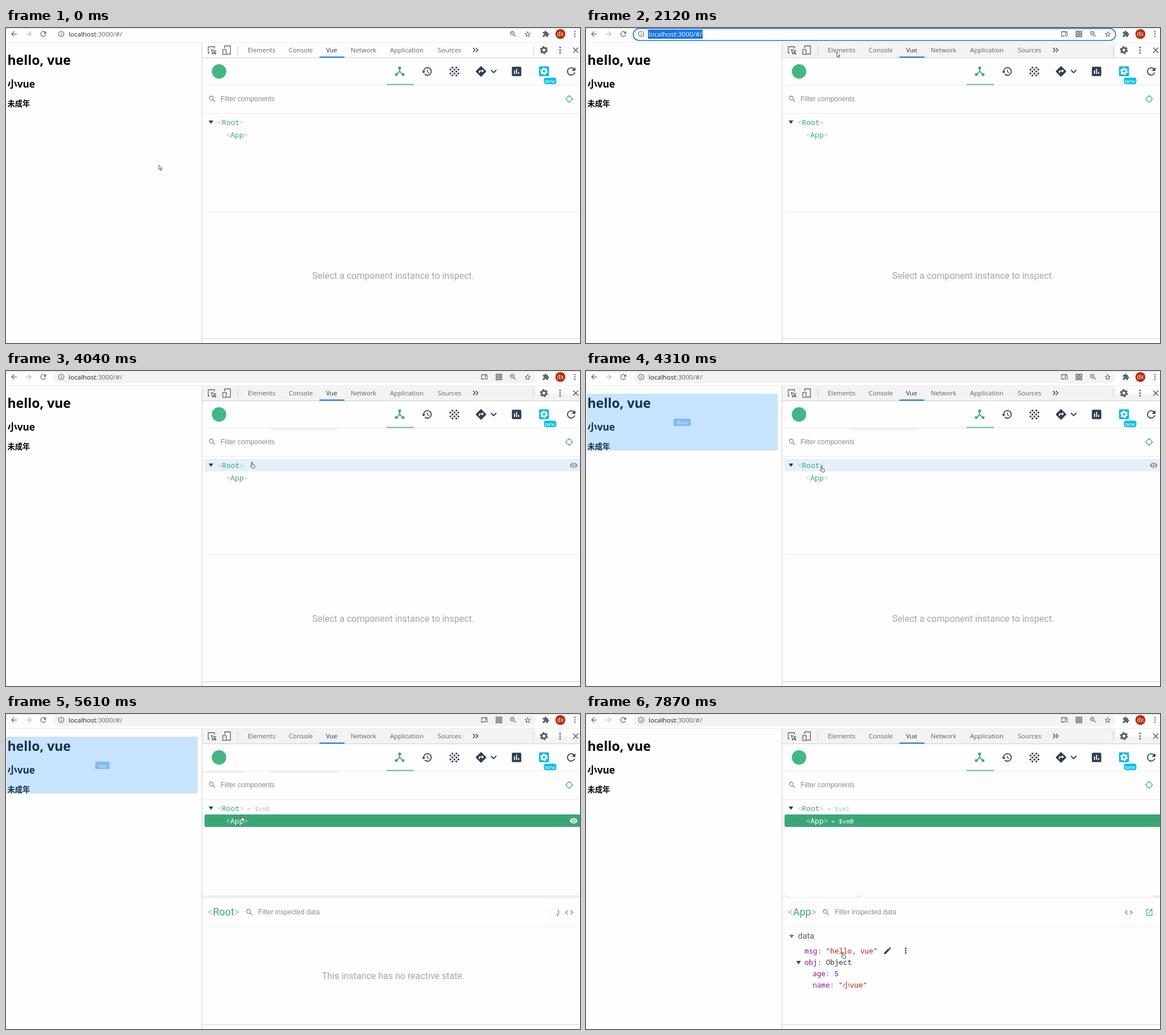
An HTML page that plays this animation: 1009x555 px, repeating every 7.99 s.

```html
<!DOCTYPE html>
<html lang="en">
<head>
<meta charset="utf-8">
<title>Component inspector</title>
<style>
html, body { margin: 0; width: 100%; height: 100%; overflow: hidden; background: #fefefe; }
svg { display: block; width: 1009px; height: 555px; }
text { white-space: pre; }
.ui { font-family: "Open Sans", "Noto Sans CJK SC", sans-serif; }
.cjk { font-family: "Noto Sans CJK SC", "Noto Sans CJK", sans-serif; }
.arial { font-family: "Liberation Sans", sans-serif; }
.roboto { font-family: Roboto, sans-serif; }
.mono { font-family: "Noto Sans Mono", "Noto Sans CJK SC", monospace; }
.serif { font-family: "Liberation Serif", serif; }
.bold { font-weight: 700; }
</style>
</head>
<body>
<svg id="stage" viewBox="0 0 1009 555"></svg>
<script>
const LOOP = 7990;
const GREEN = '#3ba776', INK = '#2c3e50', GREY = '#5f6368', LINE = '#e8e8e8';

const escape = s => s.replace(/&/g, '&amp;').replace(/</g, '&lt;').replace(/>/g, '&gt;');
const text = (x, y, s, size, fill, cls, extra = '') =>
  `<text x="${x}" y="${y}" font-size="${size}" fill="${fill}" class="${cls}" ${extra}>${escape(s)}</text>`;
const runs = (x, y, size, parts, cls = 'mono') =>
  `<text x="${x}" y="${y}" font-size="${size}" class="${cls}">` +
  parts.map(([s, fill]) => `<tspan fill="${fill}">${escape(s)}</tspan>`).join('') + '</text>';
const rect = (x, y, w, h, fill, rx = 0, extra = '') =>
  `<rect x="${x}" y="${y}" width="${w}" height="${h}" fill="${fill}" rx="${rx}" ${extra}/>`;
const disc = (x, y, r, fill) => `<circle cx="${x}" cy="${y}" r="${r}" fill="${fill}"/>`;
const ring = (x, y, r, stroke, w = 1.4, extra = '') =>
  `<circle cx="${x}" cy="${y}" r="${r}" fill="none" stroke="${stroke}" stroke-width="${w}" ${extra}/>`;
const path = (d, stroke, w = 1.4) => `<path d="${d}" fill="none" stroke="${stroke}" stroke-width="${w}"/>`;
const dots = (x, y, gap, r, fill) => [-gap, 0, gap].map(d => disc(x, y + d, r, fill)).join('');

// Shows its content from one time until another.
const during = (from, to, ...content) =>
  `<g data-from="${from}" data-to="${to}">${content.join('')}</g>`;

const GLYPHS = {
  back: 'M20 11H7.8l5.6-5.6L12 4l-8 8 8 8 1.4-1.4L7.8 13H20z',
  reload: 'M17.65 6.35A8 8 0 1 0 19.73 14h-2.08A6 6 0 1 1 12 6c1.66 0 3.14.69 4.22 1.78L13 11h7V4z',
  search: 'M15.5 14h-.8l-.3-.3A6.5 6.5 0 1 0 13.7 14.4l.3.3v.8l5 5 1.5-1.5zM9.5 14a4.5 4.5 0 1 1 0-9 4.5 4.5 0 0 1 0 9z',
  star: 'M12 2l3 7 7.3.7-5.5 4.8 1.6 7.2L12 18l-6.4 3.7 1.6-7.2L1.7 9.7 9 9zM12 6.5l-1.7 4-4.3.4 3.3 2.8-1 4.2 3.7-2.2 3.7 2.2-1-4.2 3.3-2.8-4.3-.4z',
  puzzle: 'M20.5 11H19V7a2 2 0 0 0-2-2h-4V3.5a2.5 2.5 0 0 0-5 0V5H4a2 2 0 0 0-2 2v3.8h1.5a2.7 2.7 0 0 1 0 5.4H2V20a2 2 0 0 0 2 2h3.8v-1.5a2.7 2.7 0 0 1 5.4 0V22H17a2 2 0 0 0 2-2v-4h1.5a2.5 2.5 0 0 0 0-5z',
  hub: 'M17 16l-4-4V8.8A3 3 0 1 0 11 8.8V12l-4 4H3v5h5v-3l4-4.2 4 4.2v3h5v-5z',
  history: 'M13 3a9 9 0 0 0-9 9H1l4 4 4-4H6a7 7 0 1 1 2.06 4.94l-1.42 1.42A9 9 0 1 0 13 3zM12 8v5l4.3 2.5.7-1.2-3.5-2V8z',
  route: 'M21.7 11.3l-9-9a1 1 0 0 0-1.4 0l-9 9a1 1 0 0 0 0 1.4l9 9a1 1 0 0 0 1.4 0l9-9a1 1 0 0 0 0-1.4zM14 14.5V12h-4v3H8v-4a1 1 0 0 1 1-1h5V7.5l3.5 3.5z',
  chart: 'M5 3h14a2 2 0 0 1 2 2v14a2 2 0 0 1-2 2H5a2 2 0 0 1-2-2V5a2 2 0 0 1 2-2zM7 10v7h2v-7zM11 7v10h2V7zM15 13v4h2v-4z',
  pencil: 'M3 17.2V21h3.8L17.8 9.9l-3.7-3.7zM20.7 7a1 1 0 0 0 0-1.4l-2.3-2.3a1 1 0 0 0-1.4 0l-1.9 1.8 3.8 3.8z',
  eye: 'M12 4.5C7 4.5 2.7 7.6 1 12c1.7 4.4 6 7.5 11 7.5s9.3-3.1 11-7.5c-1.7-4.4-6-7.5-11-7.5zM12 17a5 5 0 1 1 0-10 5 5 0 0 1 0 10zm0-8a3 3 0 1 0 0 6 3 3 0 0 0 0-6z',
  open: 'M19 19H5V5h7V3H5a2 2 0 0 0-2 2v14a2 2 0 0 0 2 2h14a2 2 0 0 0 2-2v-7h-2zM14 3v2h3.6l-9.8 9.8 1.4 1.4L19 6.4V10h2V3z'
};
const icon = (name, cx, cy, size, fill, flip = 1) =>
  `<path d="${GLYPHS[name]}" fill="${fill}" fill-rule="evenodd" transform="translate(${cx} ${cy}) scale(${flip * size / 24} ${size / 24}) translate(-12 -12)"/>`;
const gear = (x, y, r, fill) => {
  const tooth = 2 * Math.PI * r * .85 / 12;
  return ring(x, y, r * .58, fill, r * .46) + ring(x, y, r * .85, fill, r * .34, `stroke-dasharray="${tooth}"`);
};
const triangle = (x, y, fill) => `<path d="M${x - 4} ${y - 3}h8l-4 6z" fill="${fill}"/>`;
const code = x => path(`M${x - 2.5} 346l-3.5 3.5 3.5 3.5M${x + 2.5} 346l3.5 3.5-3.5 3.5`, GREEN, 1.3);

function browserBar() {
  return [
    rect(0, 0, 1009, 1, '#dadada'),
    during(1220, 1610, rect(83, 0.5, 848, 21, '#ebecee', 10.5)),
    during(1610, 3030,
      rect(83, 1, 848, 21, '#fff', 10.5, 'stroke="#1a73e8" stroke-width="1.6"'),
      rect(109, 3, 96, 16, '#1a73e8')),
    during(3030, LOOP, rect(83, 0.5, 848, 21, '#f1f3f4', 10.5)),
    icon('back', 14, 10.5, 15, GREY),
    icon('back', 40, 10.5, 15, '#b9bbbe', -1),
    icon('reload', 65.5, 10.5, 15, GREY),
    ring(97, 10.5, 4.8, GREY, 1.1), rect(96.4, 9.8, 1.2, 3.4, GREY), rect(96.4, 7.6, 1.2, 1.2, GREY),
    during(0, 1610, address('#202124', GREY)),
    during(1610, 3030, address('#fff', '#fff')),
    during(3030, LOOP, address('#202124', GREY)),
    during(1610, LOOP,
      path('M836 12V6.5h10M834.5 14h6.5', GREY, 1.3), rect(842.5, 8.5, 3.5, 5.5, 'none', 0, `stroke="${GREY}"`),
      [[861, 5], [867, 5], [861, 11], [867, 11]].map(([x, y]) =>
        rect(x + .5, y + .5, 4, 4, 'none', 0, `stroke="${GREY}" stroke-width="1.3"`) + disc(x + 2.5, y + 2.5, .7, GREY)).join('')),
    icon('search', 891.5, 10.5, 14, GREY), rect(888, 8.5, 4, 1, GREY),
    icon('star', 917, 10.5, 13, GREY),
    icon('puzzle', 949, 10.5, 13, GREY),
    disc(974.5, 10.5, 8.8, '#b9300d'),
    text(974.5, 14, 'dx', 10, '#fff', 'ui', 'text-anchor="middle"'),
    dots(1000, 10.5, 4.3, 1.2, GREY),
    rect(0, 25, 1009, 1, '#ececec')
  ].join('');
}
function address(host, rest) {
  return runs(110, 14.7, 11.6, [['localhost', host], [':3000/#/', rest]], 'ui');
}

function page() {
  return [
    text(2.5, 65, 'hello, vue', 23, '#000', 'ui bold'),
    text(2.5, 104.5, '小vue', 17.2, '#000', 'ui bold'),
    text(2.5, 137.5, '未成年', 13.3, '#000', 'cjk bold'),
    during(4160, 6710, rect(1, 40, 336, 100, 'rgba(72,162,248,.3)', 2)),
    during(4160, 5240, rect(154, 84, 30, 13, '#7ebaf8', 2),
      text(169, 93.5, '<Root>', 8, '#e8f3ff', 'serif', 'text-anchor="middle"')),
    during(5240, 6710, rect(157, 84, 25, 13, '#7ebaf8', 2),
      text(169.5, 93.5, 'App', 7, '#e8f3ff', 'ui', 'text-anchor="middle"'))
  ].join('');
}

function toolbars() {
  const tabs = [[425, 'Elements'], [497, 'Console'], [562.5, 'Vue'], [606, 'Network'], [675, 'Application'], [759, 'Sources']];
  const grain = [...Array(25).keys()].filter(i => i % 2).map(i =>
    disc(781.2 + (i % 5) * 3.5, 69.6 + Math.floor(i / 5) * 3.5, 1.7, INK)).join('');
  return [
    during(1220, LOOP, rect(345, 26, 586, 26, '#f3f3f3')),
    during(3800, LOOP, rect(931, 40, 78, 12, '#f3f3f3')),
    path('M358 44h-2.5V33h11v3M361 38l2.5 8 1.6-3 3 3 1-1-3-3 2.6-1.5z', GREY, 1.3),
    path('M384.5 36v-4.5h10V46H388', GREY, 1.3), rect(381, 38, 6, 8.5, 'none', 0, `stroke="${GREY}" stroke-width="1.3"`),
    rect(407, 31, 1, 16, '#ccc'),
    tabs.map(([x, s]) => text(x, 43, s, 11.3, s === 'Vue' ? '#333' : GREY, 'ui')).join(''),
    path('M821 35l3.5 3.7-3.5 3.7M826 35l3.5 3.7-3.5 3.7', '#444', 1.5),
    rect(926.5, 31, 1, 16, '#ccc'),
    gear(945.5, 39, 7, GREY), dots(974, 39, 4.8, 1.5, GREY),
    path('M997 34.5l9 9M1006 34.5l-9 9', GREY, 1.7),
    rect(345, 52, 664, 1, '#d0d0d0'), rect(551, 50.3, 44, 2, '#1a73e8'),

    disc(374.5, 76.5, 12.7, '#41b883'),
    icon('hub', 692, 76, 22, GREEN),
    icon('history', 740, 76.5, 20, INK),
    grain,
    icon('route', 835, 76.5, 22, INK), path('M852.5 74l4.7 4.6 4.7-4.6', INK, 1.9),
    icon('chart', 897.5, 76.5, 22, INK),
    rect(937, 67.5, 17.5, 17.5, '#0bbbe2', 2), gear(945.7, 76.3, 6.5, '#fff'),
    rect(945.5, 87.5, 22, 11.5, '#08c0e8', 4),
    text(956.5, 97, 'new', 11, '#fff', 'serif', 'text-anchor="middle"'),
    icon('reload', 993.5, 76.5, 22, INK),
    rect(351, 100, 658, 1, LINE), rect(669, 98.5, 48, 2, '#68bf98'),
    during(3650, 3800, rect(523, 101, 61, 2.7, '#efefef')),
    during(3800, 6710, rect(464, 101, 120, 2.7, '#efefef')),
    during(5240, 6710, rect(345, 101, 75, 2.7, '#efefef')),

    icon('search', 362.5, 125, 15, '#7f7f7f'),
    text(377, 128.6, 'Filter components', 12, '#8b8b8b', 'arial'),
    ring(990, 125, 4.8, GREEN, 1.2), path('M990 118v3M990 129v3M983 125h3M994 125h3', GREEN, 1.2),
    rect(345, 150, 664, 1, LINE)
  ].join('');
}

function treeRow(x, y, name, active, suffix) {
  const bracket = active ? '#d3ecdf' : '#bdbdbd';
  return runs(x, y, 13, [['<', bracket], [name, active ? '#fff' : GREEN], ['>', bracket]]) +
    (suffix ? text(x + (name.length + 2) * 7.8 + 5.5, y, '= ' + suffix, 11, active ? '#fff' : '#bdbdbd', 'mono') : '');
}
const rowFill = (y, fill) => rect(349, y, 664, 22, fill, 3);

function tree() {
  const root = (active, suffix) => triangle(360.3, 166, active ? '#fff' : INK) + treeRow(371.5, 171, 'Root', active, suffix);
  const app = (active, suffix) => treeRow(386.5, 193, 'App', active, suffix);
  const eye = (y, fill) => icon('eye', 998, y, 15, fill);
  return [
    during(4040, 4780, rowFill(155, '#e3f1fd'), eye(166.3, '#949ba2')),
    during(4780, 5610, rowFill(155, GREEN)),
    during(4780, 5240, eye(166.3, '#fff')),
    during(5240, 5610, rowFill(177, '#e3f1fd'), eye(188.3, '#949ba2')),
    during(5610, LOOP, rowFill(177, GREEN)),
    during(5610, 6710, eye(188.3, '#fff')),
    during(0, 4780, root(false)),
    during(4780, 5610, root(true, '$vm0')),
    during(5610, 5760, root(false, '$vm0')),
    during(5760, LOOP, root(false, '$vm1')),
    during(0, 5610, app(false)),
    during(5610, 5760, app(true)),
    during(5760, LOOP, app(true, '$vm0')),
    rect(351, 323, 658, 1, LINE),
    during(4780, 6710, rect(345, 319.5, 664, 5, '#f1f1f1')),
    during(6710, LOOP, [[346, 11], [475, 11], [997, 12]].map(([x, w]) => rect(x, 319.5, w, 4, '#efefef')).join(''))
  ].join('');
}

function inspector() {
  const title = (name, searchX) =>
    runs(354.5, 355, 18, [['<', '#b5b5b5'], [name, GREEN], ['>', '#b5b5b5']], 'roboto') +
    icon('search', searchX, 349.5, 15, '#7f7f7f') +
    text(searchX + 15.3, 353, 'Filter inspected data', 12, '#8b8b8b', 'arial') +
    rect(345, 374, 664, 1, '#eee');
  const note = (y, s) => text(680.7, y, s, 16, '#a5a5a5', 'roboto', 'text-anchor="middle"');
  const entry = (x, y, key, ...value) => runs(x, y, 12.6, [[key, '#881391'], [': ', INK], ...value]);
  const string = s => [['"', INK], [s, '#c41a16'], ['"', INK]];
  return [
    during(0, 4780, note(442, 'Select a component instance to inspect.')),
    during(4780, 5760, title('Root', 428), code(990), note(467, 'This instance has no reactive state.')),
    during(5610, 5760, ring(964, 349.5, 7, '#eceeee', 1.2), path('M970 345.3a7 7 0 0 1-2 10.4', GREEN, 1.5)),
    during(5760, LOOP,
      title('App', 422), code(954), icon('open', 990, 349.5, 15, GREEN),
      triangle(361.5, 392, '#66788a'), text(372.5, 396, 'data', 14.5, '#486078', 'roboto'),
      entry(384, 422, 'msg', ...string('hello, vue')),
      triangle(373.7, 438, INK), entry(384, 442, 'obj', ['Object', '#333']),
      entry(398.5, 462, 'age', ['5', '#0033cc']),
      entry(398.5, 482, 'name', ...string('小vue'))),
    during(6990, LOOP, icon('pencil', 530, 417, 16, INK), dots(562, 417, 4, 1.4, INK)),
    rect(345, 547, 664, 1, '#cfcfcf')
  ].join('');
}

const POINTERS = {
  arrow: '<path d="M.8.5v8.3l2-1.7 1.4 3 1.3-.6-1.4-2.9h2.6z" fill="#fff" stroke="#444" stroke-width=".9"/>',
  hand: '<path d="M2.4 1.2a.9.9 0 0 1 1.8 0V5l3 .6q1.4.4 1.2 1.9L7.8 11H3.6L.7 7.5q.4-1.2 1.7 0z" fill="#fff" stroke="#333" stroke-width=".9"/>',
  beam: '<path d="M-2-4h1.5L0-3.5.5-4H2M0-3.5v7M-2 4h1.5L0 3.5.5 4H2" fill="none" stroke="#333" stroke-width="1"/>'
};
const STEPS = [
  [0, 268, 241, 'arrow'], [400, 267.5, 241, 'arrow'], [550, 262, 225, 'arrow'], [670, 249, 190, 'arrow'],
  [940, 243, 120, 'arrow'], [1070, 236, 42, 'arrow'], [1220, 233, 28, 'arrow'], [1340, 231, 18, 'beam'],
  [1460, 230, 15, 'beam'], [1880, 252, 18, 'beam'], [2000, 335, 29, 'arrow'], [2120, 440, 42, 'arrow'],
  [2240, 570, 60, 'arrow'], [2360, 632, 71, 'hand'], [2510, 618, 64, 'hand'], [2630, 600, 55, 'arrow'],
  [2760, 584, 47, 'hand'], [2880, 575, 43, 'hand'], [3650, 523, 92, 'arrow'], [3800, 470, 122, 'arrow'],
  [3920, 441, 150, 'arrow'], [4040, 429, 160, 'hand'], [4160, 419, 164, 'hand'], [4310, 411, 167, 'hand'],
  [5240, 411, 175, 'hand'], [5360, 411, 178, 'hand'], [5760, 411, 184, 'hand'], [5880, 411, 188.5, 'hand'],
  [6160, 419, 188.5, 'hand'], [6310, 428, 188, 'hand'], [6440, 436, 188, 'hand'], [6710, 456, 300, 'arrow'],
  [6830, 471, 367, 'arrow'], [6990, 471, 421, 'hand'], [7130, 459, 424, 'hand'], [7290, 452, 421, 'hand'],
  [7410, 448.5, 420, 'hand'], [7870, 448, 419.5, 'hand']
];

const stage = document.getElementById('stage');
stage.innerHTML = rect(0, 0, 1009, 555, '#fefefe') + browserBar() + page() + toolbars() + tree() + inspector() +
  rect(344, 26, 1, 529, '#cfcfcf') + '<g id="pointer"></g>';
const pointer = document.getElementById('pointer');
const timed = [...stage.querySelectorAll('[data-from]')].map(el => ({ el, from: +el.dataset.from, to: +el.dataset.to }));
let shape = '';

function draw() {
  const t = performance.now() % LOOP;
  for (const { el, from, to } of timed) el.style.display = t >= from && t < to ? '' : 'none';
  const [, x, y, kind] = STEPS.findLast(step => step[0] <= t);
  if (kind !== shape) pointer.innerHTML = POINTERS[shape = kind];
  pointer.setAttribute('transform', `translate(${x} ${y})`);
  requestAnimationFrame(draw);
}
draw();
</script>
</body>
</html>
```
